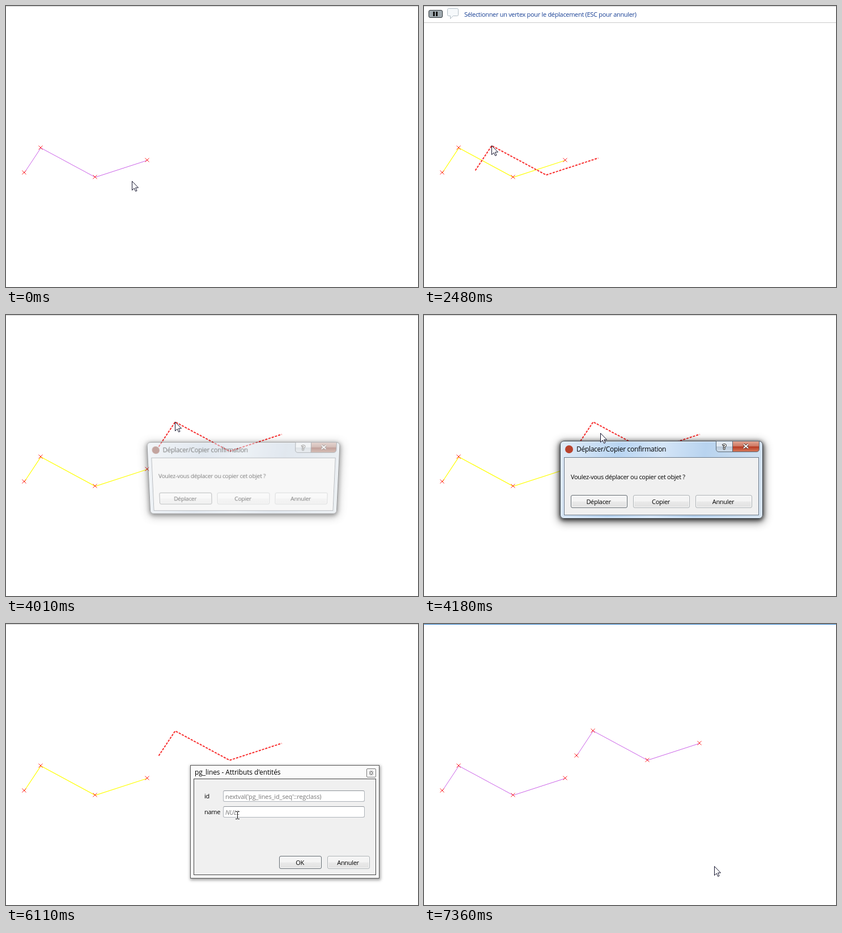
Recreate the animation shown at these times as an HTML page. Size 727 px wide and 498 px high, loop 7.51 s.

```html
<!DOCTYPE html>
<html lang="fr">
<head>
<meta charset="utf-8">
<title>Déplacer ou copier un objet</title>
<style>
html, body { margin: 0; width: 100%; height: 100%; overflow: hidden; background: #fff; }
body { position: relative; font: 11px/16px "Open Sans", "Noto Sans", sans-serif; letter-spacing: -.31px; color: #000; }
svg, div, span, b { position: absolute; box-sizing: border-box; }
svg { left: 0; top: 0; overflow: visible; }
span { white-space: nowrap; }
.rule { left: 0; width: 727px; height: 1px; background: #c9c9c9; }
.blue { background: #2c7fcb; }
.bar { left: 0; top: 0; width: 727px; height: 30px; }
.bar span { left: 71px; top: 7px; color: #173f94; }
.line, .picked, .band { fill: none; }
.line { stroke: #cb62e8; }
.picked { stroke: #ff0; stroke-width: 1.2; }
.band { stroke: #f83030; stroke-width: 2; stroke-dasharray: 4 2; }
.cross { stroke: #f22; fill: none; }

.win { border: 1px solid #333d48; }
.title { font-size: 12px; letter-spacing: -.29px; }
.pane { background: #f0f0f0; border: 1px solid #6c7a89; }
.btn { height: 23px; padding-right: 2px; border: 1px solid #adb2b5; border-radius: 3px; text-align: center; line-height: 21px;
  background: linear-gradient(#f4f4f4 48%, #e9e9e9 52%, #e2e2e2); box-shadow: inset 0 0 0 1px #fafafa; }
.main { border-color: #626a70; }
.hover { border-color: #7eb0da; background: linear-gradient(#eef6fc 48%, #e0eaf2 52%, #dce7f0);
  box-shadow: inset 0 2px 0 #6bb1ee, inset 0 0 0 1px #d5eafa; }
.down { border-color: #47799c; background: linear-gradient(#d9ecf8 48%, #b4d7ee 52%, #a5cde8); box-shadow: inset 1px 1px 2px #7797ab; }

#ask { left: 240px; top: 223px; width: 358px; height: 138px; border-radius: 7px;
  background: linear-gradient(100deg, #e0ebf7, #b9d5f2 28%, #d4e5f7 48%, #b8d3ef 68%, #d5e3f0);
  box-shadow: inset 0 0 0 1px #eef6fd, 0 2px 7px 1px rgba(0,0,0,.65), 0 4px 15px 3px rgba(0,0,0,.45); }
#ask .title { left: 28px; top: 6px; }
#ask .pane { left: 6px; top: 28px; width: 344px; height: 103px; }
#ask .btn { top: 95px; width: 100px; }
.badge { left: 8px; top: 7px; width: 14px; height: 14px; border-radius: 50%; background: #b9432e; }
.cap { top: -1px; height: 20px; border: 1px solid #5a6876; text-align: center; }
.help { left: 274px; width: 30px; border-radius: 0 0 0 5px; background: linear-gradient(#e2eaf3 48%, #b9c8d8 52%, #d0deec);
  font: bold 13px/18px "Open Sans", sans-serif; color: #fff; -webkit-text-stroke: 2px #333; paint-order: stroke; }
.close { left: 303px; width: 48px; border-radius: 0 0 5px 0; background: linear-gradient(#e3a592, #cd7661 48%, #b83a22 52%, #d4785a); }

#form { left: 325px; top: 250px; width: 334px; height: 201px; border-color: #555; background: #fbfbfb;
  box-shadow: 1px 2px 5px 1px rgba(0,0,0,.38); }
#form.active { background: #e3edf7; box-shadow: 0 2px 6px 1px rgba(0,0,0,.55), 0 3px 12px 2px rgba(0,0,0,.35); }
#form .title { left: 7px; top: 4px; letter-spacing: -.1px; }
#form .pane { left: 5px; top: 23px; width: 322px; height: 171px; border-color: #444; }
#form .btn { top: 160px; width: 75px; }
.x { left: 310px; top: 5px; width: 17px; height: 16px; border: 1px solid #777; border-radius: 2px; background: #f6f6f6; }
.field { left: 57px; width: 250px; height: 20px; padding-left: 3px; line-height: 19px; border: 1px solid #aeb3b9;
  border-top-color: #8d9299; border-radius: 3px; background: #fff; color: #777; white-space: nowrap; letter-spacing: -.12px; }
</style>
</head>
<body>
<div class="rule" style="top:0"></div>
<div class="rule blue" style="top:0" data-on="3790-4010,7360-7510"></div>

<div class="bar" data-on="710-3790">
  <svg width="70" height="30">
    <rect x="8.5" y="7.5" width="24" height="13" rx="2.5" fill="#a0aab0" stroke="#30363a"/>
    <path d="M16 10h3v8h-3zM21 10h3v8h-3z" fill="#111"/>
    <path d="M43.5 4.5h15q2 0 2 2v9q0 2-2 2h-7l-5 5v-5h-3q-2 0-2-2v-9q0-2 2-2z" fill="#f6f9fb" stroke="#b3bec6"/>
  </svg>
  <span>Sélectionner un vertex pour le déplacement (ESC pour annuler)</span>
  <div class="rule" style="top:29px"></div>
</div>

<svg width="727" height="498">
  <defs>
    <polyline id="shape" transform="translate(.5 .5)"/>
    <path id="marks" class="cross"/>
    <clipPath id="cut"><path d="M-4-11h16v15h-16z"/></clipPath>
  </defs>
  <use href="#shape" class="line" data-on="0-450,7360-7510"/>
  <use href="#shape" class="picked" data-on="450-7360"/>
  <use href="#marks"/>
  <g transform="translate(237 -62)" data-on="7360-7510">
    <use href="#shape" class="line"/><use href="#marks"/>
  </g>
  <g id="spot" data-on="790-2150">
    <g clip-path="url(#cut)"><circle r="11" fill="#ff2c2c"/><path d="M-3-3L3 3M-3 3L3-3" stroke="#d00000"/></g>
  </g>
  <use id="band" href="#shape" class="band" data-on="2150-7360"/>
</svg>

<div id="ask" class="win" data-on="4010-5570">
  <b class="badge"></b>
  <span class="title">Déplacer/Copier confirmation</span>
  <div class="cap help">?</div>
  <div class="cap close"><svg width="46" height="18"><path d="M19 5l8 7M27 5l-8 7" stroke="#54372f" stroke-width="4"/><path d="M19 5l8 7M27 5l-8 7" stroke="#fff" stroke-width="2"/></svg></div>
  <div class="pane"></div>
  <span style="left:18px;top:55px">Voulez-vous déplacer ou copier cet objet ?</span>
  <div id="move" class="btn" style="left:18px">Déplacer</div>
  <div id="copy" class="btn" style="left:128px">Copier</div>
  <div class="btn" style="left:238px">Annuler</div>
</div>

<div id="form" class="win" data-on="5570-7360">
  <span class="title">pg_lines - Attributs d'entités</span>
  <div class="x"><svg width="15" height="14"><path d="M5 4l5 6M10 4l-5 6" stroke="#444" stroke-width="3"/><path d="M5 4l5 6M10 4l-5 6" stroke="#fff" stroke-width="1.2"/></svg></div>
  <div class="pane"></div>
  <span style="left:24px;top:46px">id</span>
  <div class="field" style="top:44px">nextval('pg_lines_id_seq'::regclass)</div>
  <span style="left:24px;top:74px">name</span>
  <div class="field" style="top:72px;font-style:italic">NULL</div>
  <div id="ok" class="btn main" style="left:156px">OK</div>
  <div class="btn" style="left:241px">Annuler</div>
</div>

<svg width="727" height="498">
  <g id="cursor">
    <path id="arrow" d="M.5.5V16.5L4.2 13 6.7 18.4 9 17.4 6.6 12H11.5Z" fill="#fff" stroke="#15152e"/>
    <path id="beam" d="M-3-6.5H0M1-6.5H4M.5-6V6M-3 6.5H0M1 6.5H4" fill="none" stroke="#111"/>
  </g>
</svg>

<script>
const LOOP = 7510, STEP = 78, DROP = 3790;
const $ = id => document.getElementById(id);
const vertices = [[32, 295], [61, 251], [157, 303], [249, 273]];

// pointer strokes: each bends from the last resting place past `via` to `to`
const home = [222, 310];
const strokes = [
  { from: 80, until: 450, via: [208, 299], to: [194, 291] },
  { from: 710, until: 1410, via: [86, 296], to: [66, 256] },
  { from: 2150, until: 2870, via: [123, 252], to: [164, 228] },
  { from: 2940, until: DROP, via: [245, 200], to: [298, 189] },
  { from: 4170, until: 4730, via: [350, 270], to: [404, 336] },
  { from: 6110, until: 6740, via: [418, 345], to: [512, 429] }
];

$('shape').setAttribute('points', vertices.join(' '));
$('marks').setAttribute('d', vertices.map(([x, y]) =>
  `M${x - 3.5} ${y - 3.5}l7 7m0-7l-7 7`).join(''));

const timed = [...document.querySelectorAll('[data-on]')].map(el =>
  ({ el, spans: el.dataset.on.split(',').map(s => s.split('-').map(Number)) }));

const bend = (a, b, c, k) => (1 - k) ** 2 * a + 2 * k * (1 - k) * b + k * k * c;

// share of a stroke done at time t, in even steps
function progress({ from, until }, t) {
  const steps = Math.round((until - from) / STEP);
  const i = Math.floor((t - from + 4) * steps / (until - from));
  return Math.min(1, (i + 1) / (steps + 1));
}

function pointer(t) {
  let spot = home;
  for (const s of strokes) {
    if (t < s.from) break;
    const k = progress(s, t);
    spot = spot.map((v, axis) => Math.round(bend(v, s.via[axis], s.to[axis], k)));
  }
  return spot;
}

const place = (el, x, y) => el.setAttribute('transform', `translate(${x} ${y})`);
const show = (el, on) => { el.style.display = on ? '' : 'none'; };

function render(t) {
  for (const { el, spans } of timed) show(el, spans.some(([a, b]) => t >= a && t < b));

  const [x, y] = pointer(t);
  const beam = t >= 5570 && y < 344;
  place($('cursor'), x, y);
  show($('arrow'), !beam);
  show($('beam'), beam);

  const dist = ([vx, vy]) => Math.hypot(vx - x, vy - y);
  place($('spot'), ...vertices.reduce((a, b) => dist(b) < dist(a) ? b : a));

  const [bx, by] = pointer(Math.min(t, DROP));
  place($('band'), bx - vertices[1][0], by - vertices[1][1]);

  // the dialog tilts and fades in over two steps
  const tilt = Math.max(0, 1 - Math.floor((t - 4010) / 80) * .6);
  const ask = $('ask').style;
  ask.opacity = 1 - .48 * tilt;
  ask.filter = tilt ? `saturate(${1 - .5 * tilt})` : 'none';
  ask.transform = tilt ? `translateY(${-2 * tilt}px) perspective(620px) rotateX(${-10 * tilt}deg) scale(${1 - .064 * tilt})` : 'none';

  const pressed = t >= 5400;
  $('move').classList.toggle('main', !pressed);
  $('copy').classList.toggle('hover', !pressed && y > 318 && x > 368);
  $('copy').classList.toggle('down', pressed);

  $('form').classList.toggle('active', t >= 7110);
  $('form').style.opacity = t >= 7280 ? .5 : 1;
  $('ok').classList.toggle('hover', y > 410 && x > 481);
}

const start = performance.now();
function tick() {
  render((performance.now() - start) % LOOP);
  requestAnimationFrame(tick);
}
tick();
</script>
</body>
</html>
```
